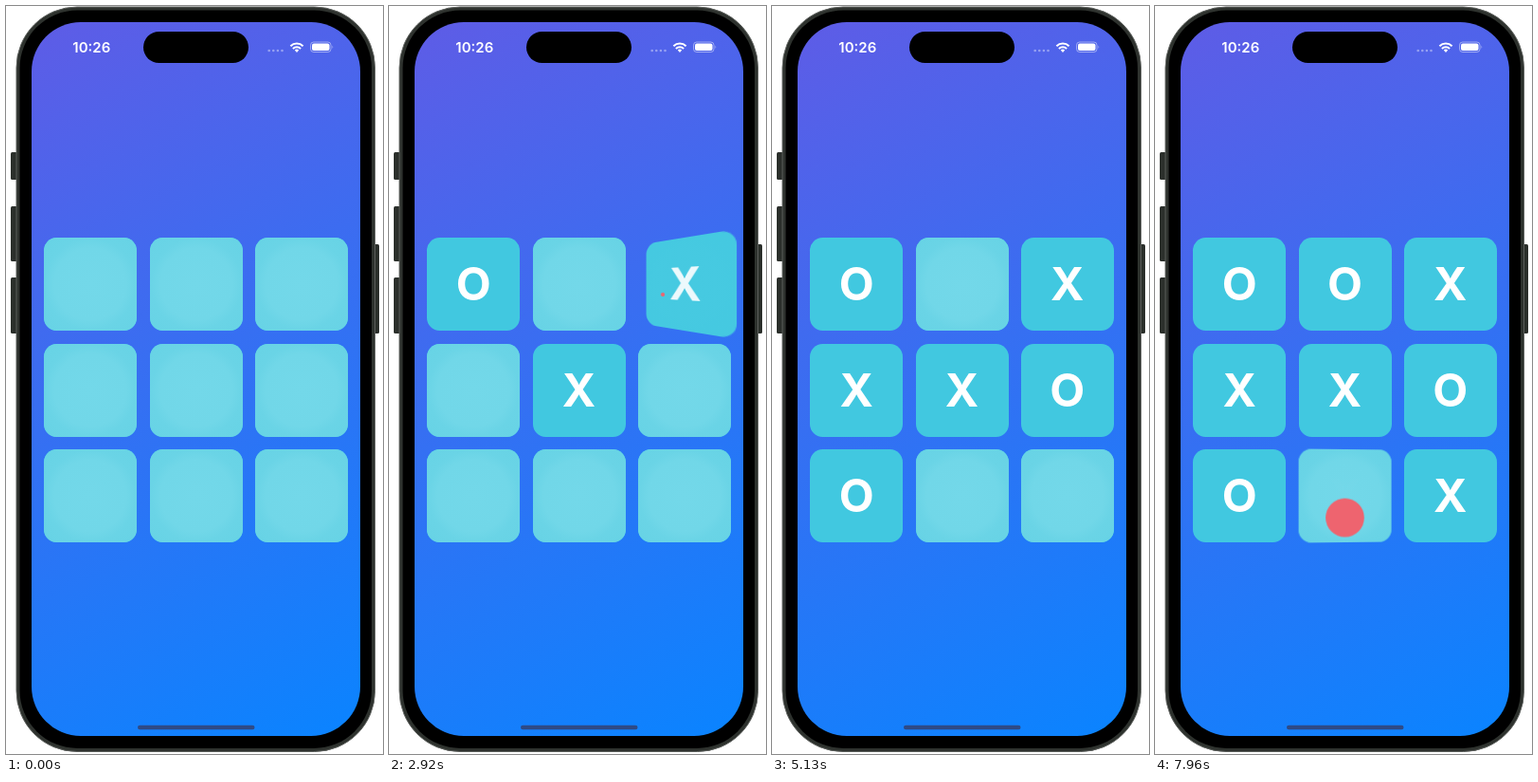
Write an HTML page that moves like this. It is 398x788 px and loops after 8000 ms.

```html
<!DOCTYPE html>
<html lang="en">
<head>
<meta charset="utf-8">
<title>Tic-tac-toe</title>
<style>
html, body { margin: 0; width: 100%; height: 100%; overflow: hidden; background: #fff; }
#stage { position: relative; width: 398px; height: 788px; overflow: hidden; }
svg { position: absolute; left: 0; top: 0; }
#screen {
  position: absolute; left: 27px; top: 17px; width: 347px; height: 752px; border-radius: 52px;
  background: linear-gradient(155.2deg, #5e5ce6, #0a84ff);
}
.tile {
  position: absolute; width: 98px; height: 98px; border-radius: 13.5px; background: #41c8e0;
  font: 700 48px/98px Inter, sans-serif; color: #fff; text-align: center;
}
.cover {
  position: absolute; inset: 0; border-radius: inherit;
  background: radial-gradient(circle, #73d8e9 0, #71d7e8 38px, #6ad4e6 48px, #67d3e5 66px);
}
.mark { position: absolute; inset: 0; }
#tap {
  position: absolute; left: -25px; top: -25px; width: 50px; height: 50px;
  border-radius: 50%; background: #ee646f;
}
</style>
</head>
<body>
<div id="stage">
  <svg width="398" height="788">
    <g fill="#2b2f2b">
      <rect x="5" y="154" width="7" height="29" rx="1.5"/>
      <rect x="5" y="211" width="7" height="58" rx="1.5"/>
      <rect x="5" y="286" width="7" height="59" rx="1.5"/>
      <rect x="387" y="251" width="7" height="94" rx="1.5"/>
    </g>
    <rect x="11" y="1" width="378.5" height="784.5" rx="64" fill="#2e322e" stroke="#5b5e5b"/>
    <rect x="14.5" y="4.5" width="371.5" height="777.5" rx="61" fill="#000"/>
  </svg>
  <div id="screen"></div>
  <svg width="398" height="788" fill="#fff">
    <rect x="145" y="27" width="111" height="33" rx="16.5" fill="#000"/>
    <text x="90.3" y="49" text-anchor="middle" font-family="Inter, sans-serif" font-weight="600" font-size="15">10:26</text>
    <g opacity=".4">
      <circle cx="277.7" cy="47" r="1.3"/><circle cx="282.3" cy="47" r="1.3"/>
      <circle cx="286.9" cy="47" r="1.3"/><circle cx="291.5" cy="47" r="1.3"/>
    </g>
    <g fill="none" stroke="#fff" stroke-width="2">
      <path d="M300.4 42.3a9.4 9.4 0 0 1 13.2 0M302.9 45a5.9 5.9 0 0 1 8.2 0"/>
    </g>
    <path d="M307 48.9l-2.2-2.3a3.2 3.2 0 0 1 4.4 0z"/>
    <rect x="321.5" y="38" width="21.5" height="10.5" rx="3.2" fill="none" stroke="#fff" opacity=".45"/>
    <rect x="323" y="39.5" width="18.5" height="7.5" rx="2"/>
    <path d="M344.5 41.5q1.6 1.7 0 3.6z" opacity=".5"/>
    <rect x="139" y="757.7" width="123.500" height="4.500" rx="2.250" fill="#2e4a86"/>
  </svg>
  <div id="board"></div>
  <div id="tap"></div>
</div>
<script>
const LOOP = 8000, FLIP_DELAY = 45, FLIP = 700, TAP = 833, TAP_CUT = 730;

// Player taps flip a tile; replies appear at once.
const taps = [
  { at: 330, cell: 4, x: 193, y: 408.5 },
  { at: 2330, cell: 2, x: 289, y: 304 },
  { at: 4210, cell: 3, x: 73, y: 428.5 },
  { at: 6170, cell: 8, x: 297, y: 492 },
  { at: 7880, cell: 7, x: 200.5, y: 539 }
];
const replies = [[1210, 0], [3210, 6], [5130, 5], [7040, 1]];

const clamp = v => Math.min(1, Math.max(0, v));

// cubic-bezier(.42, 0, .58, 1)
function easeInOut(x) {
  if (x <= 0 || x >= 1) return clamp(x);
  let lo = 0, hi = 1;
  for (let i = 0; i < 24; i++) {
    const u = (lo + hi) / 2, v = 1 - u;
    if (1.26 * u * v * v + 1.74 * u * u * v + u * u * u < x) lo = u; else hi = u;
  }
  return lo * lo * (3 - 2 * lo);
}

const board = document.getElementById('board');
const tap = document.getElementById('tap');

function add(parent, name) {
  const el = document.createElement('div');
  el.className = name;
  return parent.appendChild(el);
}

const tiles = Array.from({ length: 9 }, (_, i) => {
  const el = add(board, 'tile');
  el.style.left = 40.2 + i % 3 * 111.3 + 'px';
  el.style.top = 244.3 + Math.floor(i / 3) * 111.2 + 'px';
  return { el, cover: add(el, 'cover'), mark: add(el, 'mark') };
});
taps.forEach(m => tiles[m.cell].mark.textContent = 'X');
replies.forEach(([, cell]) => tiles[cell].mark.textContent = 'O');

function reveal(cell, p, turning) {
  const { el, cover, mark } = tiles[cell];
  el.style.transform = turning ? `perspective(98px) rotateY(${180 * p}deg)` : 'none';
  cover.style.opacity = 1 - p;
  mark.style.opacity = p;
}

function draw(t) {
  let active = null;
  for (const m of taps) {
    const dt = t - m.at;
    const p = easeInOut((dt - FLIP_DELAY) / FLIP);
    reveal(m.cell, p, p > 0 && p < 1);
    if (dt >= 0 && dt < TAP_CUT) active = m;
  }
  for (const [at, cell] of replies) reveal(cell, t >= at ? 1 : 0, false);

  tap.style.display = active ? 'block' : 'none';
  if (active) {
    const size = (1 - (t - active.at) / TAP) ** 2;
    tap.style.transform = `translate(${active.x}px, ${active.y}px) scale(${size})`;
  }
}

const start = performance.now();
function tick() {
  draw((performance.now() - start) % LOOP);
  requestAnimationFrame(tick);
}
tick();
</script>
</body>
</html>
```
